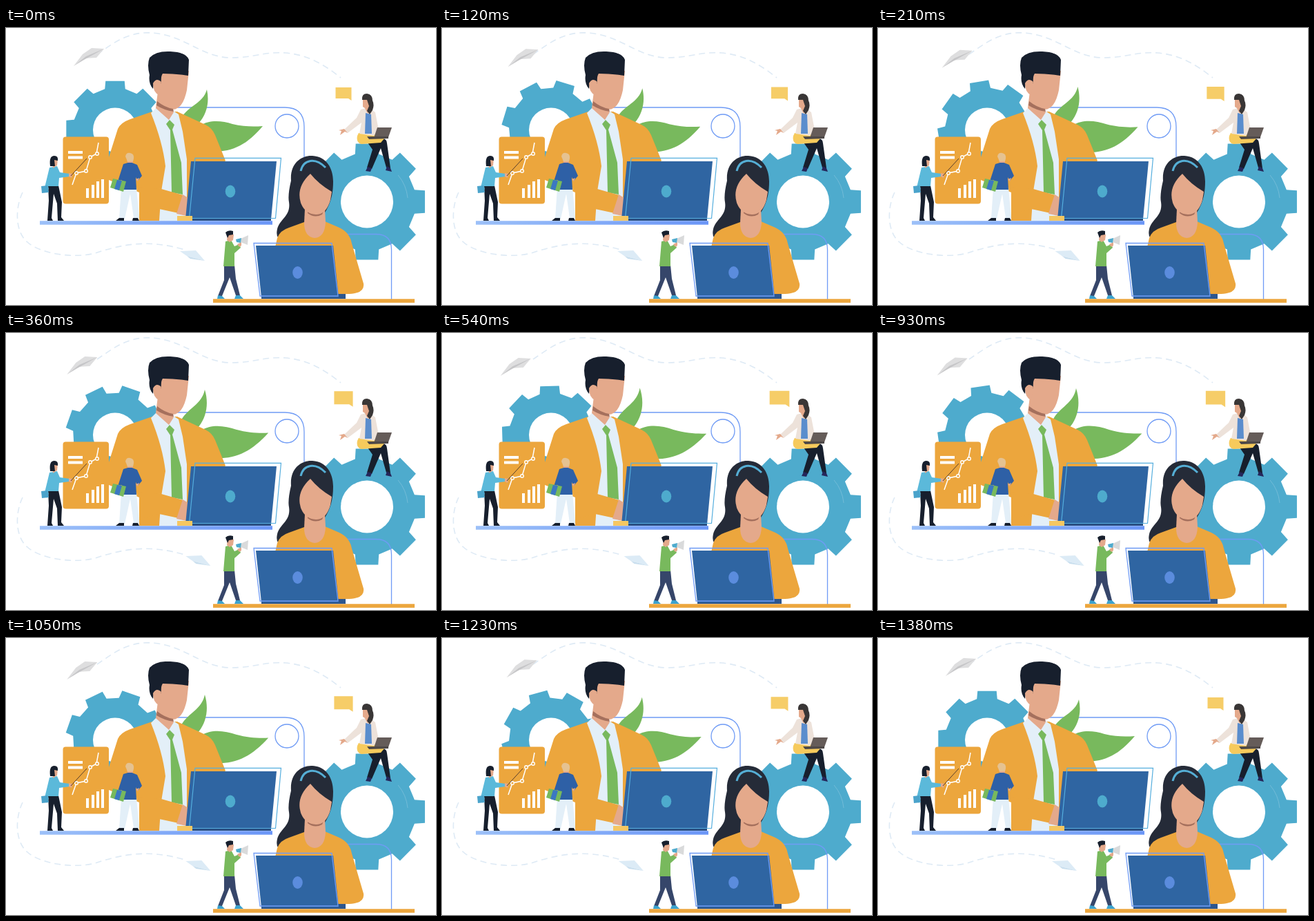
An HTML page for the animation above (1.44 s loop, 623 px wide and 401 px high).

```html
<!DOCTYPE html>
<html lang="en">
<head>
<meta charset="utf-8">
<title>Team at work</title>
<style>
html, body { margin: 0; width: 100%; height: 100%; overflow: hidden; background: #fff; }
svg { display: block; width: 623px; height: 401px; }
.gear { fill: #4eabcd; }
.orange { fill: #eca63d; }
.dark { fill: #171f2d; }
.hair { fill: #252b38; }
.skin { fill: #e4a98b; }
.shade { fill: #a5705d; }
.pale { fill: #e3eff8; }
.green { fill: #78b95d; }
.screen { fill: #2f65a2; }
.line { fill: none; stroke: #6f9bf5; stroke-width: 1.3; }
.dash { fill: none; stroke: #deeaf5; stroke-width: 1.6; stroke-dasharray: 9 6; }
</style>
</head>
<body>
<svg viewBox="0 0 623 401">
  <linearGradient id="desk"><stop stop-color="#9cc0f8"/><stop offset="1" stop-color="#6b96f7"/></linearGradient>

  <!-- Flight paths and planes -->
  <path class="dash" d="M132 38C150 26 169 10 198 7C254 4 279 42 325 43C362 43 372 34 405 36C441 39 466 57 485 72"/>
  <path class="dash" d="M24 238C13 261 13 295 31 310C50 327 98 334 129 326C160 316 202 303 262 322"/>
  <g id="plane">
    <path fill="#dededf" d="M98 55L111 38L124 29L142 30L131 43L113 44Z"/>
    <path fill="#c6c6c8" d="M98 55L116 41L142 30L113 46Z"/>
  </g>
  <g id="glider">
    <path fill="#dcebf6" d="M252 323L275 322L288 337L262 330Z"/>
    <path fill="#c8deee" d="M262 330L288 337L267 334Z"/>
  </g>

  <!-- Gears and outlines -->
  <path id="smallGear" class="gear"/>
  <circle cx="158" cy="147.500" r="32" fill="#fff"/>
  <path id="bigGear" class="gear"/>
  <path d="M568 213Q580 227 582 246" fill="none" stroke="#7bbfda" stroke-width=".8"/>
  <circle cx="523" cy="251.500" r="38" fill="#fff"/>
  <path class="line" d="M240 115H404Q432 115 432 143V188M490 298.500H536Q558.500 298.500 558.500 321V393"/>
  <circle class="line" cx="407" cy="142" r="17"/>
  <path id="leafTall" class="green" d="M250 142C256 112 284 114 291 89C295 107 291 125 279 138L262 150Z"/>
  <path id="leafWide" class="green" d="M262 165C277 131 305 132 328 139C345 143 359 143 372 142C350 168 330 179 300 179Z"/>

  <!-- Large man -->
  <path class="orange" d="M212 121L180 132Q166 137 162 146L149 187V220L193 238V279H262L290 230L318 192L303 155Q299 145 289 140L248 121Z"/>
  <path class="pale" d="M210 123L219 114L244 121L250 125L256 150L262 190V279H222L225 236L231 200Q227 165 210 123Z"/>
  <path class="skin" d="M222 62H265L262 90Q256 119 240 118L243 122L236 133L217 116L220 92Z"/>
  <path class="shade" d="M219 106Q230 115 242 117L243 121Q229 119 218 112Z"/>
  <path class="green" d="M232 139L237 133L244 140L241 147L254 195L256 241L240 238L238 148Z"/>
  <path class="dark" d="M213 88Q206 80 208 68Q204 53 208 43Q217 33 238 34Q261 35 265 46L264 69Q245 66 227 66Q224 70 225 80H214Z"/>
  <path class="skin" d="M213 80Q218 71 225 78L222 97Q213 94 213 80Z"/>
  <path class="orange" d="M193 230L225 233L257 242L250 268L222 262L193 270Z"/>
  <path class="skin" d="M256 241L264 246L262 272L247 269Z"/>

  <!-- First desk and laptop -->
  <path class="screen" d="M268 193H392L384 277H260Z"/>
  <path fill="none" stroke="#55aede" stroke-width="1.200" d="M274 188.300H398.500L390.500 275.500H265.500Z"/>
  <ellipse class="gear" cx="325" cy="236.500" rx="7.300" ry="9"/>
  <path fill="#294f83" d="M261 276H384V279H261Z"/>
  <path fill="#f5c762" d="M248 272H270V279H248Z"/>
  <path fill="url(#desk)" d="M49 279.300H386V284.700H49Z"/>

  <!-- Chart board -->
  <rect class="orange" x="82.500" y="157.500" width="66.500" height="97" rx="4"/>
  <path fill="none" stroke="#fff" stroke-width="4" d="M90 180H111M90 187.500H111M118 246V232M126 246V227M133 246V222M140 246V219"/>
  <path fill="none" stroke="#fff" stroke-width="1.500" d="M96 227L102 210L116 207L122 187L131 182L134 166"/>
  <g class="orange" stroke="#fff" stroke-width="1.400">
    <circle cx="102" cy="210" r="2.300"/><circle cx="116" cy="207" r="2.300"/>
    <circle cx="122" cy="187" r="2.300"/><circle cx="132" cy="182" r="2.300"/>
  </g>

  <!-- Presenter -->
  <path class="dark" d="M61 228H76L81 252L80 274L84 279H75L74 254L69 240L66 275L68 279H60L62 250Z"/>
  <path fill="#5bb9da" d="M63 202L74 200L78 209L92 211V215L77 217L76 229H61L62 234L56 231Z"/>
  <path fill="#4aa3cb" d="M51 229L60 228L62 238L52 239Z"/>
  <path class="skin" d="M67 189H75L74 199L68 203ZM91 210L96 211L95 217L91 215Z"/>
  <path class="dark" d="M64 200Q62 185 70 185Q76 185 75 192L70 191L71 200Z"/>
  <path d="M94 214L117 189" stroke="#593f2d"/>

  <!-- Man seen from behind -->
  <path class="pale" d="M167 231H189L193 275H185L180 240L172 276H164Z"/>
  <path class="dark" d="M159 279L164 275H171V279ZM183 279L184 275H191L193 279Z"/>
  <path fill="#2e60a6" d="M170 197L180 194L190 198L197 214L191 221L188 216L189 234H167L168 220L162 222Z"/>
  <path class="green" d="M155 218L174 222L170 237L151 231Z"/>
  <path fill="#3b78c2" d="M161 220L168 221L164 235L157 233Z"/>
  <path class="skin" d="M175 188H184V195H176ZM188 219L193 217L191 222Z"/>
  <path fill="#e5c291" d="M173 186Q174 180 180 181Q186 182 185 189L184 193H176Z"/>

  <!-- Large woman -->
  <path class="hair" d="M413 221C411 195 429 184 444 185C465 186 474 204 474 222C474 246 468 258 459 272L448 287L400 306Q390 305 393 291C397 276 413 272 410 252Q408 242 413 221Z"/>
  <path class="orange" d="M432 281L410 289Q397 293 393 304L387 330L395 385H497Q520 384 518 370L501 312Q498 296 483 289L462 280Z"/>
  <path class="skin" d="M433 262L462 262L463 281Q462 303 447 304Q432 302 432 282Z"/>
  <path class="shade" d="M437 263Q449 271 461 263L458 270Q447 276 437 268Z"/>
  <path class="skin" d="M441 211Q453 226 472 237L470 249Q464 270 449 270Q433 269 427 253Q420 230 441 211Z"/>
  <path fill="none" stroke="#55aed5" stroke-width="3" d="M427 207C431 190 448 187 463 202"/>

  <!-- Second desk and laptop -->
  <path fill="#2d568e" d="M370 385H492V392H370Z"/>
  <path class="screen" d="M362 315H474L482 390H370Z"/>
  <path class="line" d="M359 311.500H472L481 388H368Z"/>
  <ellipse cx="422.500" cy="354" rx="7.300" ry="9" fill="#5b8cdd"/>
  <path class="orange" d="M300 392.300H592V397.700H300Z"/>

  <!-- Man with megaphone -->
  <path fill="#36466a" d="M316 343H331L333 363L339 387H333L324 361L313 388H307L316 365Z"/>
  <path fill="#3ba2ce" d="M306 392L307 387L313 388L317 392ZM331 392L333 387H339L344 392Z"/>
  <path class="green" d="M318 309L326 307L331 316L338 313L340 318L331 326V345H315Z"/>
  <path class="skin" d="M321 299H330L329 307L324 310L320 307ZM335 313L341 310V315L338 317Z"/>
  <path class="dark" d="M318 296Q322 292 329 294V299L323 300L321 304Z"/>
  <path fill="#d9dadb" d="M340 305L351 300L350 314L340 310Z"/>
  <path class="gear" d="M333 306L341 304L340 311L334 310Z"/>

  <!-- Speech bubble -->
  <path id="bubble" fill="#f6cd68" d="M477.500 86H500.500V105L496 102H477.500Z"/>

  <!-- Seated woman -->
  <path class="dark" d="M524 166L546 160Q552 161 552 167L557 203L551 202L543 174L530 204L523 202L531 176Z"/>
  <path fill="#25265a" d="M521 207L524 201L530 203L528 208ZM550 206L552 200L557 203L559 208Z"/>
  <path fill="#f6ca5c" d="M511 152H533L549 159L543 166L515 168Q507 166 509 156Z"/>
  <path fill="#ede2da" d="M514 118L525 115L535 122L540 148L533 156L512 153L515 137L495 152L490 147L508 130Z"/>
  <path fill="#5a8dcd" d="M521 123L529 125L530 153H520Z"/>
  <path class="skin" d="M517 103L526 102L527 118L524 124L520 116L517 114ZM495 152L491 150L484 155L486 149L482 148L490 146Z"/>
  <path fill="#393636" d="M516 104Q515 95 523 95Q531 96 531 105Q534 111 531 119L527 125L523 120L526 113L523 104Z"/>
  <path fill="#655c59" d="M538 144H559L554 158L533 159Z"/>
  <path fill="#4e4948" d="M523 157H554V160L526 161Z"/>
</svg>
<script>
const LOOP = 1440, STEP = 30;
const $ = id => document.getElementById(id);
const move = (id, transform) => $(id).setAttribute('transform', transform);

// Eight tapered teeth around a round body, centred on (cx, cy).
function gearPath(cx, cy, body, outer) {
  const point = (r, deg) => {
    const a = deg * Math.PI / 180;
    return `${(cx + r * Math.cos(a)).toFixed(2)} ${(cy + r * Math.sin(a)).toFixed(2)}`;
  };
  let d = '';
  for (let a = 0; a < 360; a += 45) {
    d += `${a ? 'L' : 'M'}${point(body, a - 14)}L${point(outer, a - 11)}L${point(outer, a + 11)}`
       + `L${point(body, a + 14)}`;
  }
  return d + 'Z';
}
$('smallGear').setAttribute('d', gearPath(158, 147.5, 61, 72));
$('bigGear').setAttribute('d', gearPath(523, 251.5, 71, 85.5));

const pivot = (x, y, angle, scale) =>
  `translate(${x} ${y}) rotate(${angle}) scale(${scale}) translate(${-x} ${-y})`;

function draw(now) {
  // Swings out and back, resting for two steps at each end of the loop.
  const step = Math.min(46, Math.max(1, Math.floor(now % LOOP / STEP)));
  const p = Math.max(0, Math.sin(Math.PI * (step - 1) / 45)) ** 1.1;
  move('plane', `translate(${-14.5 * p} ${7.5 * p})`);
  move('glider', `translate(${12.5 * p} 0)`);
  move('smallGear', `rotate(${96 * p} 158 147.5)`);
  move('leafTall', pivot(255, 150, -7 * p, 1 + 0.1 * p));
  move('leafWide', pivot(262, 165, 3 * p, 1 + 0.1 * p));
  move('bubble', pivot(489, 95.5, 0, 1 + 0.27 * p));
}

const start = performance.now();
function tick() {
  draw(performance.now() - start);
  requestAnimationFrame(tick);
}
tick();
</script>
</body>
</html>
```
